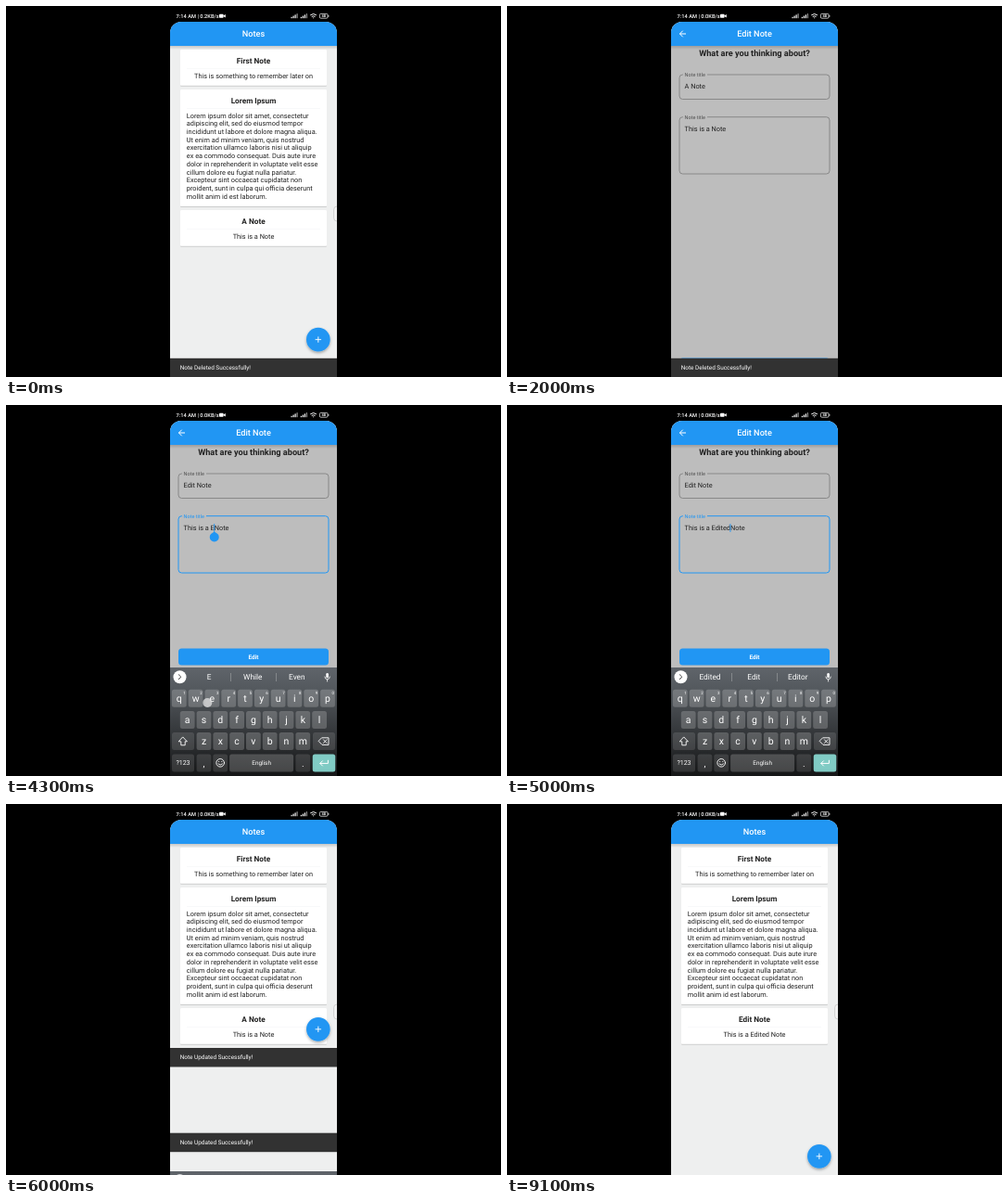
These frames come from a looping animation (534x400 px, 10000 ms). An HTML page:

```html
<!DOCTYPE html>
<html lang="en">
<head>
<meta charset="utf-8">
<title>Notes app</title>
<style>
  html, body { margin: 0; width: 100%; height: 100%; overflow: hidden; background: #000; }
  svg { display: block; width: 100vw; height: 100vh; }
  text { font-family: Roboto, sans-serif; white-space: pre; text-rendering: geometricPrecision; }
  .line { fill: none; stroke: #fff; stroke-width: 1; stroke-linecap: round; stroke-linejoin: round; }
</style>
</head>
<body>
<svg id="stage" viewBox="0 0 534 400"></svg>
<script>
const LOOP = 10000, STEP = 100;
const BLUE = '#2196f3', INK = '#212121', PAGE = '#bdbdbd';
const DP = 180 / 393; // the phone is 393 dp wide
const SMALL = 12 * DP, LABEL = 14 * DP, BODY = 16 * DP, TITLE = 18 * DP, HEAD = 20 * DP;

// Markup helpers
const text = (x, y, size, str, { fill = INK, weight = 400, anchor = 'middle', id = '' } = {}) =>
  `<text ${id && `id="${id}"`} x="${x}" y="${(y + size * 0.35).toFixed(2)}" font-size="${size.toFixed(2)}" fill="${fill}" font-weight="${weight}" text-anchor="${anchor}">${str}</text>`;
const rect = (x, y, w, h, fill, r = 0, more = '') =>
  `<rect x="${x}" y="${y}" width="${w}" height="${h}" rx="${r}" fill="${fill}" ${more}/>`;
const line = (d, more = '') => `<path class="line" d="${d}" ${more}/>`;
const white = { fill: '#fff' };

const appBar = title =>
  rect(177, 43, 180, 4, 'url(#shade)') + rect(177, 17, 180, 26, BLUE) +
  text(267, 30.2, HEAD, title, { fill: '#fff', weight: 500 });

const card = (y, h, title, id = '') =>
  rect(188, y, 158, h, '#fff', 1, 'filter="url(#lift)"') +
  text(267, y + 11.7, TITLE, title, { weight: 700, id }) +
  rect(195, y + 20.2, 144, 0.5, '#f0f3f4');

const lorem = `Lorem ipsum dolor sit amet, consectetur
adipiscing elit, sed do eiusmod tempor
incididunt ut labore et dolore magna aliqua.
Ut enim ad minim veniam, quis nostrud
exercitation ullamco laboris nisi ut aliquip
ex ea commodo consequat. Duis aute irure
dolor in reprehenderit in voluptate velit esse
cillum dolore eu fugiat nulla pariatur.
Excepteur sint occaecat cupidatat non
proident, sunt in culpa qui officia deserunt
mollit anim id est laborum.`.split('\n');

const listPage = () =>
  rect(177, 17, 180, 390, '#eeefef') +
  card(47, 38.7, 'First Note') + text(267, 75, BODY, 'This is something to remember later on') +
  card(90, 126, 'Lorem Ipsum') +
  lorem.map((s, i) => text(194.8, 118 + i * 8.73, BODY, s, { anchor: 'start' })).join('') +
  card(220, 38.7, 'A Note', 'cardTitle') + text(267, 248.2, BODY, 'This is a Note', { id: 'cardText' }) +
  rect(353.6, 216, 8, 16, '#f2f2f2', 3.5, 'stroke="#bbb" stroke-width=".6"') +
  appBar('Notes') +
  `<g id="fab"><circle r="${28 * DP}" fill="${BLUE}" filter="url(#float)"/>${line('M-3.2 0H3.2M0 -3.2V3.2', 'style="stroke-linecap:butt;stroke-width:.92"')}</g>`;

const field = (n, y, h, value) =>
  rect(186, y, 162, h, 'none', 3.5, `id="box${n}"`) + rect(190, y - 1, 26, 2, PAGE) +
  text(191.6, y + 0.2, SMALL, 'Note title', { anchor: 'start', id: 'label' + n }) +
  text(191.6, y + 12.8, BODY, value, { anchor: 'start', id: 'value' + n });

const editPage = () =>
  rect(177, 17, 180, 383, PAGE) +
  text(267, 50.8, HEAD, 'What are you thinking about?', { weight: 700 }) +
  field(1, 74, 26.5, 'A Note') + field(2, 119.7, 61.3, 'This is a Note') +
  rect(0, 0, 0.9, 9, BLUE, 0, 'id="caret"') +
  `<path id="grip" fill="${BLUE}" d="M0 0L3.6 2.5A5 5 0 1 1 -3.6 2.5Z"/>` +
  `<g id="save">${rect(186, 0, 162, 18, BLUE, 3.5)}${text(267, 9, LABEL, 'Edit', { fill: '#fff', weight: 700 })}</g>` +
  appBar('Edit Note') +
  `<circle id="ripple" cx="191" cy="30.5" r="14.5" fill="#fff" opacity=".22"/>` +
  line('M193 30H186.5M189.7 26.7L186.4 30L189.7 33.3', 'style="stroke-linecap:butt"');

const snack = id => `<g id="${id}">${rect(177, 0, 180, 20.5, '#323232')}${text(187.8, 10.2, LABEL, '', { fill: '#fff', anchor: 'start', id: id + 'Text' })}</g>`;

// Keyboard
const keys = {};
const keyBox = (x, y, w, fill = '#fff', op = 0.2) => rect(x - w / 2, y - 9.5, w, 19, fill, 2.5, `fill-opacity="${op}"`);
function keyRow(letters, x0, y) {
  return [...letters].map((c, i) => {
    const x = x0 + i * 17.8;
    keys[c] = [x, y];
    return keyBox(x, y, 15.8) + text(x, y, 10.5, c, white) +
      (y < 320 ? text(x + 5.8, y - 6, 4.4, (i + 1) % 10, white) : '');
  }).join('');
}
const keyboard = () =>
  rect(177, 283, 180, 117, 'url(#board)') +
  `<circle cx="187.5" cy="293.2" r="7" fill="#fff"/>` + line('M186.3 290.7L188.8 293.2L186.3 295.7', 'style="stroke:#444"') +
  rect(345.3, 289, 2.6, 5.2, '#fff', 1.3) + line('M343.9 293Q344 295.8 346.6 295.8T349.3 293M346.6 296V298', 'style="stroke-width:.8"') +
  `<g id="hints">${rect(242, 289, 0.6, 9, '#a0a3a6')}${rect(291, 289, 0.6, 9, '#a0a3a6')}` +
  [219, 266.3, 313.8].map((x, i) => text(x, 293.5, 8.3, '', { fill: '#fff', id: 'hint' + i })).join('') + '</g>' +
  keyRow('qwertyuiop', 186.8, 316.3) + keyRow('asdfghjkl', 195.7, 339.4) + keyRow('zxcvbnm', 213.5, 362.6) +
  keyBox(191, 362.6, 24, '#fff', 0.12) + line('M191 358.2L195.4 362.8H193.2V366.8H188.8V362.8H186.6Z', 'style="stroke-width:.9"') +
  keyBox(343, 362.6, 24, '#fff', 0.12) + line('M341 358.8H348V366.4H341L337.4 362.6ZM342.5 360.8L346 364.4M346 360.8L342.5 364.4', 'style="stroke-width:.9"') +
  keyBox(191, 386, 24, '#fff', 0.12) + text(191, 386, 7, '?123', white) +
  keyBox(213.5, 386, 15.8, '#fff', 0.12) + text(213.5, 386, 10, ',', white) +
  keyBox(231.2, 386, 15.8, '#fff', 0.12) + `<circle class="line" cx="231.2" cy="385.8" r="4.3" style="stroke-width:.9"/>` +
  line('M229.6 384.4V384.6M232.8 384.4V384.6M229 387Q231.2 389.4 233.4 387', 'style="stroke-width:.9"') +
  keyBox(275.6, 386, 69, '#fff', 0.2) + text(275.6, 386, 6.4, 'English', white) +
  keyBox(320.3, 386, 15.8, '#fff', 0.12) + text(320.3, 386, 10, '.', white) +
  keyBox(343, 386, 24.5, '#80cbc4', 1) + line('', 'id="enter"');

const statusBar = () =>
  text(183.6, 10.8, 5.7, '', { fill: '#fff', weight: 500, anchor: 'start', id: 'clock' }) +
  rect(230, 8.8, 4.6, 4, '#fff', 0.8) + '<path fill="#fff" d="M234.4 10.6L236.8 9V12.6L234.4 11Z"/>' +
  [307.5, 317.8].map(x => [0, 1, 2, 3].map(i =>
    rect(x + i * 2, 11.8 - i * 1.2, 1.2, 1.4 + i * 1.2, '#fff', 0, i > 2 ? 'opacity=".6"' : '')).join('')).join('') +
  line('M328.6 9.6Q331.6 7.2 334.6 9.6M330 11.3Q331.6 10 333.2 11.3M331.6 12.8V12.9') +
  rect(338.4, 8.4, 8.6, 4.8, 'none', 1.2, 'stroke="#fff" stroke-width=".7"') + rect(347.5, 9.8, 0.8, 2, '#fff') +
  text(342.7, 10.8, 4, '48', { fill: '#fff', weight: 700 });

const stage = document.getElementById('stage');
stage.innerHTML = `
  <defs>
    <clipPath id="screen">${rect(177, 17, 180, 400, '#fff', 12)}</clipPath>
    <linearGradient id="shade" x2="0" y2="1"><stop stop-opacity=".17"/><stop offset="1" stop-opacity="0"/></linearGradient>
    <linearGradient id="board" x2="0" y2="1">
      <stop stop-color="#5f646a"/><stop offset=".18" stop-color="#555a5f"/>
      <stop offset=".6" stop-color="#34373a"/><stop offset="1" stop-color="#151617"/>
    </linearGradient>
    <filter id="lift"><feDropShadow dx="0" dy=".5" stdDeviation=".6" flood-opacity=".28"/></filter>
    <filter id="float" x="-30%" y="-30%" width="160%" height="170%"><feDropShadow dx="0" dy="1.5" stdDeviation="1.5" flood-opacity=".35"/></filter>
  </defs>
  ${statusBar()}
  <g clip-path="url(#screen)">
    <g id="list">${listPage()}</g>
    <g id="spinner"><circle r="8.5" fill="#fff" filter="url(#lift)"/>${line('M4 0A4 4 0 1 1 0 -4', `style="stroke:${BLUE}"`)}</g>
    <g id="edit">${editPage()}</g>
    ${snack('snackA')}${snack('snackB')}
    <g id="keyboard">${keyboard()}</g>
    <g id="popup">${rect(-9, -42, 18, 53, '#76797c', 2.5)}${text(0, -28, 12, '', { fill: '#fff', id: 'popupText' })}</g>
    <circle id="touch" r="5" fill="#e4e4e4" fill-opacity=".75"/>
  </g>`;
const el = {};
stage.querySelectorAll('[id]').forEach(e => el[e.id] = e);

// Timelines: each row starts with the time from which it holds
const pages = [ // edit opacity, edit scale, list scale
  [0, 0, 1, 1], [1300, 0.3, 0.9, 1.01], [1400, 0.8, 0.96, 1.03], [1500, 1, 0.99, 1.045],
  [1600, 1, 1, 1.05], [5800, 0.8, 0.975, 1.069], [5900, 0.15, 0.93, 1.02], [6000, 0, 1, 1]];
const bottom = [ // keyboard top, snackbar top, second snackbar top
  [0, 400, 379.8, 400], [2100, 400, 388, 400], [2200, 400, 400, 400], [2300, 350, 400, 400],
  [2400, 300, 400, 400], [2500, 283, 400, 400], [5800, 283, 263, 400], [5900, 330, 263, 400],
  [6000, 396, 263, 354.7], [6100, 400, 379.8, 400], [8800, 400, 382, 400], [8900, 400, 390, 400],
  [9000, 400, 397, 400], [9100, 400, 400, 400]];
const titles = [ // text before the caret
  [0, 'A '], [2600, 'A'], [2700, ''], [2900, 'E'], [3100, 'Ed'], [3300, 'Edi'], [3500, 'Edit'], [3700, 'Edit ']];
const words = [
  [0, ''], [4300, 'E'], [4500, 'Ed'], [4700, 'Edi'], [4800, 'Edit'], [4900, 'Edite'], [5000, 'Edited'], [5200, 'Edited ']];
const hints = [
  [0, ''], [2900, 'E So Eat'], [3100, 'Ed Edit End'], [3300, 'Edi Edit Editor'], [3500, 'Edit Editing Editor'], [3700, ''],
  [4300, 'E While Even'], [4500, 'Ed Edit End'], [4700, 'Edi Edit Editor'], [4800, 'Edit Editing Editor'],
  [4900, 'Edited Edit Editor'], [5200, '']];
const presses = { 2800: 'e', 3000: 'd', 3200: 'i', 3400: 't', 4200: 'e', 4400: 'd', 4600: 'i', 4700: 't', 4800: 'e', 4900: 'd' };
const touches = {
  1200: [267, 240], 2100: [200, 88], 2500: [343, 363], 2600: [343, 363], 3600: [275, 384], 3900: [221, 133],
  4300: [217.3, 321], 5100: [219, 294], 5800: [192.5, 34.3], 6700: [323, 300], 6800: [323, 335], 6900: [323, 364] };
const pulls = [[0, 0], [6800, 59], [6900, 66], [7000, 68], [7200, 0]];

const at = (rows, t) => rows.findLast(r => r[0] <= t).slice(1);
const show = (e, on) => e.setAttribute('visibility', on ? 'visible' : 'hidden');
const move = (e, x, y) => e.setAttribute('transform', `translate(${x} ${y})`);
const zoom = (e, s) => e.setAttribute('transform', `translate(267 204) scale(${s}) translate(-267 -204)`);

function render(t) {
  el.clock.textContent = `7:14 AM | ${t < 100 || (t >= 2500 && t < 3700) ? '0.2' : '0.0'}KB/s`;

  const [opacity, editScale, listScale] = at(pages, t);
  const [board, snackY, snackY2] = at(bottom, t);
  zoom(el.list, listScale);
  zoom(el.edit, editScale);
  el.edit.setAttribute('opacity', opacity);
  move(el.fab, 357 - 44 * DP, snackY - 44 * DP);
  el.cardTitle.textContent = t < 7100 ? 'A Note' : 'Edit Note';
  el.cardText.textContent = t < 7100 ? 'This is a Note' : 'This is a Edited Note';

  const message = `Note ${t < 5800 ? 'Deleted' : 'Updated'} Successfully!`;
  el.snackAText.textContent = el.snackBText.textContent = message;
  move(el.snackA, 0, snackY);
  move(el.snackB, 0, snackY2);
  move(el.keyboard, 0, board - 283);
  move(el.save, 0, board - 20.5);

  const focus = t < 2100 || t >= 6000 ? 0 : t < 4000 ? 1 : 2;
  for (const n of [1, 2]) {
    const on = focus === n;
    el['box' + n].setAttribute('stroke', on ? BLUE : '#666');
    el['box' + n].setAttribute('stroke-width', on ? 1 : 0.6);
    el['label' + n].setAttribute('fill', on ? BLUE : '#505050');
  }
  const before = ['', at(titles, t)[0], 'This is a ' + at(words, t)[0]];
  el.value1.textContent = before[1] + 'Note';
  el.value2.textContent = before[2] + 'Note';
  show(el.caret, focus && t < 5600);
  show(el.grip, t >= 4000 && t < 4400);
  if (focus) {
    const x = el['value' + focus].getStartPositionOfChar(before[focus].length).x;
    move(el.caret, x - 0.5, focus === 1 ? 82.4 : 128);
    move(el.grip, x, 136.5);
  }
  show(el.ripple, t === 5800);
  el.enter.setAttribute('d', focus === 1 ? 'M339 386.2L341.8 389L347.4 383.2' : 'M347.4 383.2V386.4H338.8M341.4 383.8L338.8 386.4L341.4 389');

  const hint = at(hints, t)[0];
  show(el.hints, hint);
  hint.split(' ').forEach((s, i) => el['hint' + i].textContent = s);

  const key = presses[t];
  show(el.popup, key);
  if (key) {
    move(el.popup, ...keys[key]);
    el.popupText.textContent = key;
  }
  const touch = key ? [keys[key][0] - 3.8, keys[key][1] + 5] : touches[t];
  show(el.touch, touch);
  if (touch) move(el.touch, ...touch);

  const [pull] = at(pulls, t);
  show(el.spinner, pull);
  el.spinner.setAttribute('transform', `translate(267 ${pull}) rotate(${t * 0.9 % 360})`);
}

function tick() {
  render(Math.floor(performance.now() % LOOP / STEP) * STEP);
  requestAnimationFrame(tick);
}
tick();
</script>
</body>
</html>
```
